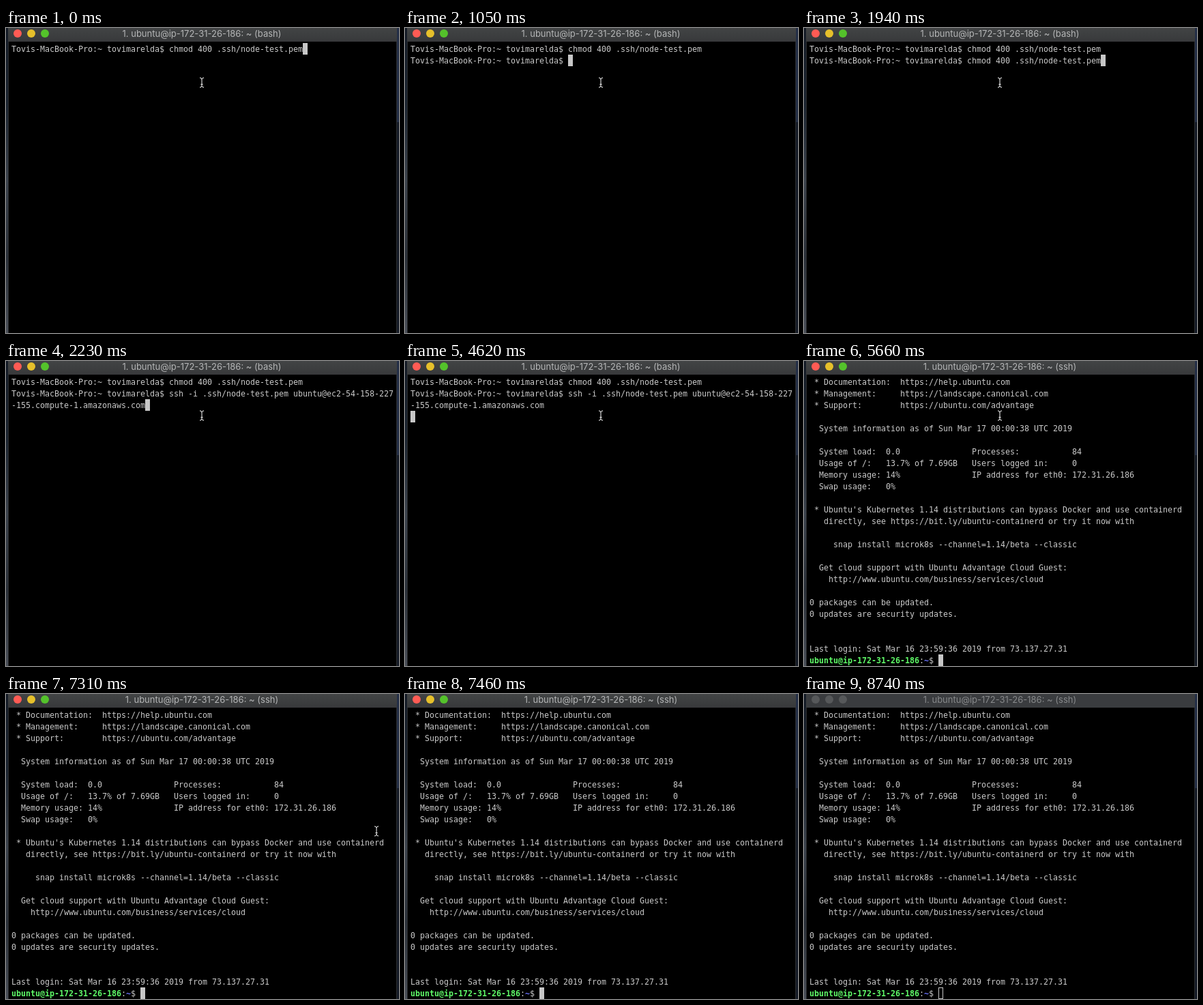
Write an HTML page with a canvas that moves like this. It is 576 by 447 pixels and loops after 8840 ms.

```html
<!DOCTYPE html>
<html lang="en">
<head>
<meta charset="utf-8">
<title>Terminal session</title>
<style>
  html, body { margin: 0; width: 100%; height: 100%; overflow: hidden; background: #000; }
  canvas { display: block; }
</style>
</head>
<body>
<canvas id="stage" width="576" height="447"></canvas>
<script>
const WIDTH = 576, HEIGHT = 447, LOOP = 8840;
const CELL_W = 7, CELL_H = 17, LEFT = 8, TOP = 22, BAR_H = 20;
const TEXT = '#c9c9c9', GREEN = '#5ffa68', BLUE = '#6871ff';
const MONO = '11.63px "DejaVu Sans Mono", monospace';
const ctx = document.getElementById('stage').getContext('2d');

const PROMPT = 'Tovis-MacBook-Pro:~ tovimarelda$ ';
const CHMOD = PROMPT + 'chmod 400 .ssh/node-test.pem';
const SSH = [
  PROMPT + 'ssh -i .ssh/node-test.pem ubuntu@ec2-54-158-227',
  '-155.compute-1.amazonaws.com'
];
const REMOTE = 'ubuntu@ip-172-31-26-186';
const WELCOME = ` * Documentation:  https://help.ubuntu.com
 * Management:     https://landscape.canonical.com
 * Support:        https://ubuntu.com/advantage

  System information as of Sun Mar 17 00:00:38 UTC 2019

  System load:  0.0               Processes:           84
  Usage of /:   13.7% of 7.69GB   Users logged in:     0
  Memory usage: 14%               IP address for eth0: 172.31.26.186
  Swap usage:   0%

 * Ubuntu's Kubernetes 1.14 distributions can bypass Docker and use containerd
   directly, see https://bit.ly/ubuntu-containerd or try it now with

     snap install microk8s --channel=1.14/beta --classic

  Get cloud support with Ubuntu Advantage Cloud Guest:
    http://www.ubuntu.com/business/services/cloud

0 packages can be updated.
0 updates are security updates.


Last login: Sat Mar 16 23:59:36 2019 from 73.137.27.31
`.split('\n');

// Terminal contents by start time; the cursor follows the last line.
const SCREENS = [
  [0, [CHMOD]],
  [1050, [CHMOD, PROMPT]],
  [1940, [CHMOD, CHMOD]],
  [2090, [CHMOD, PROMPT + 'clear']],
  [2230, [CHMOD, ...SSH]],
  [4620, [CHMOD, ...SSH, '']],
  [5660, WELCOME]
];

function rect(x, y, w, h, fill) {
  ctx.fillStyle = fill;
  ctx.fillRect(x, y, w, h);
}

function verticalGradient(y0, y1, ...colors) {
  const gradient = ctx.createLinearGradient(0, y0, 0, y1);
  colors.forEach((color, i) => gradient.addColorStop(i / (colors.length - 1), color));
  return gradient;
}

function drawText(text, row, col = 0, color = TEXT, weight = '') {
  ctx.font = `${weight} ${MONO}`;
  ctx.textAlign = 'left';
  ctx.fillStyle = color;
  [...text].forEach((char, i) =>
    ctx.fillText(char, LEFT + (col + i) * CELL_W, TOP + row * CELL_H + 13));
}

function drawCursor(row, col, active) {
  const x = LEFT + col * CELL_W, y = TOP + row * CELL_H;
  if (active) return rect(x, y, CELL_W, CELL_H, '#c7c7c7');
  ctx.strokeStyle = '#c7c7c7';
  ctx.lineWidth = 1;
  ctx.strokeRect(x + 0.5, y + 0.5, CELL_W - 1, CELL_H - 1);
}

function drawWindow(title, active) {
  rect(0, 0, WIDTH, HEIGHT, '#000');
  rect(0, 0, 3, HEIGHT, verticalGradient(0, HEIGHT, '#141b26', '#1b2430', '#3c434d', '#2a3039', '#4a4f58'));
  rect(573, 0, 3, 138, '#232e46');
  rect(573, 138, 3, HEIGHT - 138, '#141a26');
  rect(3, 0, 1, HEIGHT, '#2c2e31');
  rect(572, 0, 1, HEIGHT, '#2c2e31');
  rect(3, 0, 570, BAR_H, active ? verticalGradient(0, BAR_H, '#424445', '#38393b') : '#3a3c3f');

  const lights = active ? ['#ff5b54', '#e6c02b', '#54c22b'] : Array(3).fill('#56585a');
  lights.forEach((color, i) => {
    ctx.fillStyle = color;
    ctx.beginPath();
    ctx.arc(17 + i * 20, 8, 6, 0, Math.PI * 2);
    ctx.fill();
  });

  ctx.font = '13px Inter, sans-serif';
  ctx.textAlign = 'center';
  ctx.fillStyle = active ? '#b5b6b7' : '#87898b';
  ctx.fillText(title, 287, 13);
}

function drawPointer(x, y) {
  ctx.strokeStyle = '#fff';
  ctx.lineWidth = 1;
  ctx.stroke(new Path2D(`M${x} ${y + 0.9}q2.6 0 3 2.2q.4 -2.2 3 -2.2
    M${x + 3} ${y + 3}v10M${x + 1.5} ${y + 10.5}h3
    M${x} ${y + 15.1}q2.6 0 3 -2.2q.4 2.2 3 2.2`));
}

function draw(t) {
  const lines = SCREENS.findLast(([start]) => t >= start)[1];
  const active = t < 8740;
  const row = lines.length - 1;
  let col = lines[row].length;

  drawWindow(`1. ${REMOTE}: ~ (${t < 5520 ? 'bash' : 'ssh'})`, active);
  lines.forEach((line, i) => drawText(line, i));
  if (lines === WELCOME) {
    drawText(REMOTE, row, 0, GREEN, 'bold');
    drawText(':', row, 23);
    drawText('~', row, 24, BLUE, 'bold');
    drawText('$', row, 25);
    col = 27;
  }
  drawCursor(row, col, active);

  if (t < 7310) drawPointer(284, 72);
  else if (t < 7460) drawPointer(540, 193);
}

const startTime = performance.now();
function tick() {
  draw((performance.now() - startTime) % LOOP);
  requestAnimationFrame(tick);
}
tick();
</script>
</body>
</html>
```
